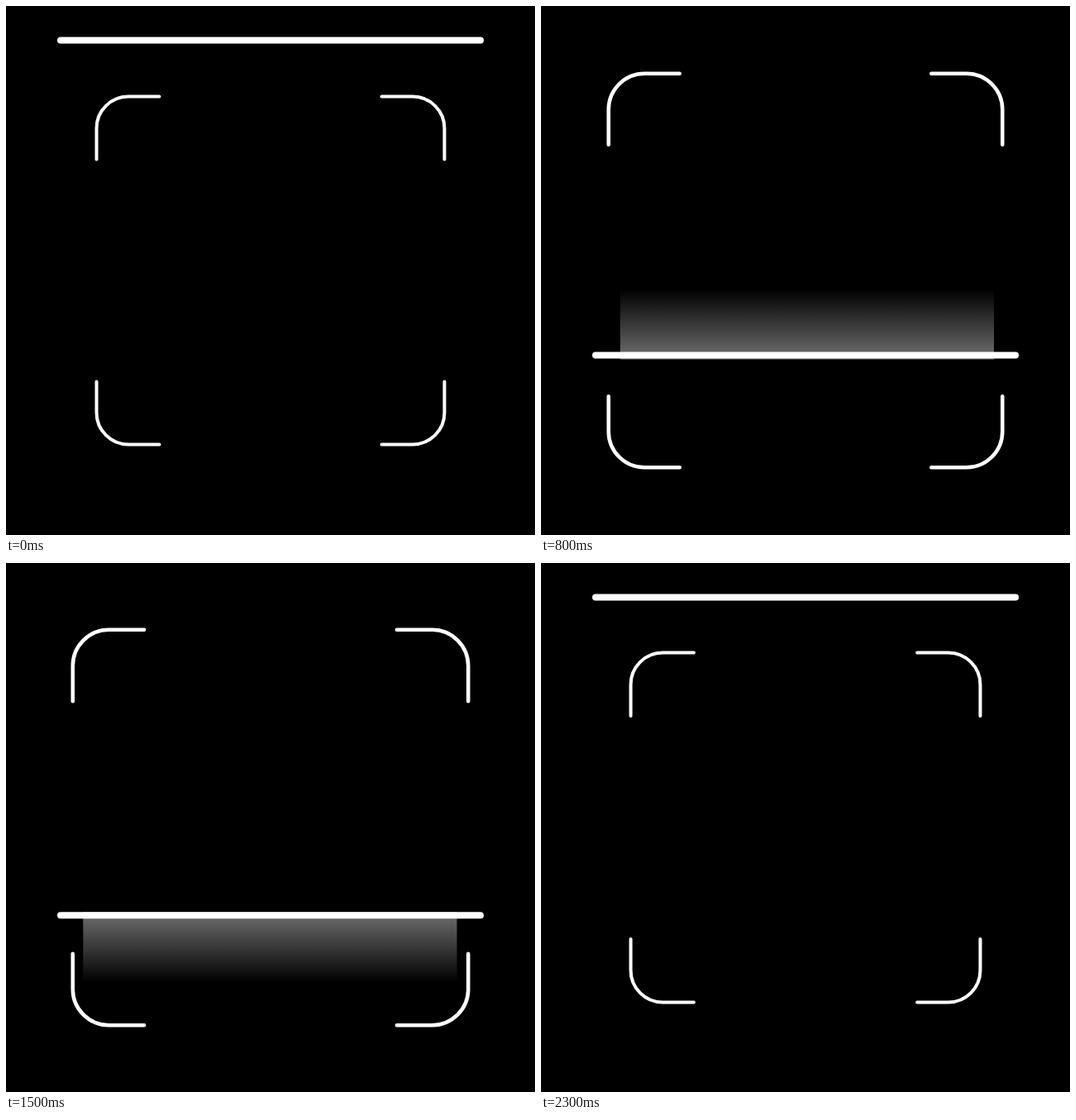
These frames come from a looping animation (640 by 640 pixels, 2400 ms). An HTML page with a canvas:

```html
<!DOCTYPE html>
<html>
<head>
<meta charset="utf-8">
<title>Scanner</title>
<style>
html, body { margin: 0; width: 100%; height: 100%; overflow: hidden; background: #000; }
canvas { display: block; }
</style>
</head>
<body>
<canvas id="stage" width="640" height="640"></canvas>
<script>
const ctx = document.getElementById('stage').getContext('2d');
const LOOP = 2400, STEP = 100;
const TOP = 41.5, BOTTOM = 570;

// 0 before a, 1 after b, linear between
const ramp = (t, a, b) => Math.min(1, Math.max(0, (t - a) / (b - a)));

const barY = t => TOP + (BOTTOM - TOP) * (ramp(t, 79, 1079) - ramp(t, 1228, 2228));

// Half size of the bracket square: a triangle wave with a rounded peak
function halfSize(t) {
  const d = t > 2364 ? t - 3564 : t - 1164;
  return 251.2 - 0.035 * (Math.abs(d) < 400 ? Math.hypot(d, 65) : Math.abs(d));
}

function drawBrackets(half) {
  const s = half / 210.5;
  for (const [sx, sy] of [[-1, -1], [1, -1], [1, 1], [-1, 1]]) {
    ctx.save();
    ctx.translate(320, 320);
    ctx.scale(sx * s, sy * s);
    ctx.lineWidth = 4;
    ctx.beginPath();
    ctx.moveTo(210.5, 134.5);
    ctx.arcTo(210.5, 210.5, 134.5, 210.5, 38.5);
    ctx.lineTo(134.5, 210.5);
    ctx.stroke();
    ctx.restore();
  }
}

// Fades from the bright edge to the far edge
function drawGlow(x, near, far, opacity) {
  if (opacity <= 0) return;
  const fade = ctx.createLinearGradient(0, near, 0, far);
  fade.addColorStop(0, `rgba(255,255,255,${0.44 * opacity})`);
  fade.addColorStop(1, 'rgba(255,255,255,0)');
  ctx.fillStyle = fade;
  ctx.fillRect(x, Math.min(near, far), 452.2, Math.abs(far - near));
}

function drawBar(y) {
  ctx.lineWidth = 8;
  ctx.beginPath();
  ctx.moveTo(66, y);
  ctx.lineTo(574, y);
  ctx.stroke();
}

function draw(t) {
  const y = barY(t), drift = 0.0014 * t;
  ctx.fillStyle = '#000';
  ctx.fillRect(0, 0, 640, 640);
  ctx.strokeStyle = '#fff';
  ctx.lineCap = 'round';
  drawGlow(94.7 + drift, y + 5, y - 80, ramp(t, 85, 285) - ramp(t, 1080, 1180));
  drawGlow(91.2 + drift, y - 4, y + 81.5, ramp(t, 1085, 1285) - ramp(t, 2130, 2230));
  drawBrackets(halfSize(t));
  drawBar(y);
}

const start = performance.now();
function tick() {
  const t = (performance.now() - start) % LOOP;
  draw(Math.floor(t / STEP) * STEP);
  requestAnimationFrame(tick);
}
tick();
</script>
</body>
</html>
```
